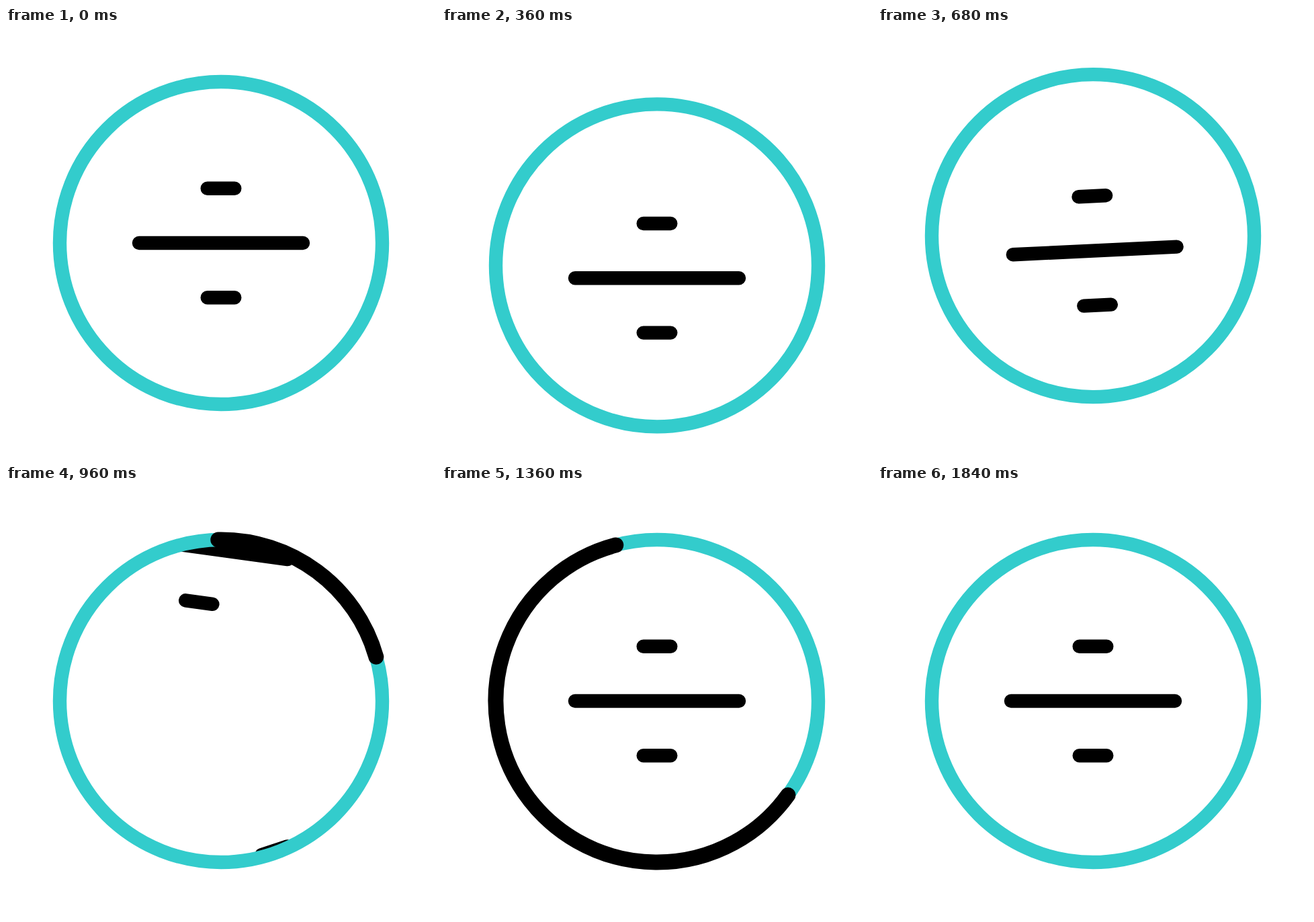
An HTML page for the animation above (2000 ms loop, 640 px wide and 640 px high).

```html
<!DOCTYPE html>
<html lang="en">
<head>
<meta charset="utf-8">
<title>Division sign</title>
<style>
  html, body { margin: 0; width: 100%; height: 100%; overflow: hidden; background: #fff; }
  svg { display: block; width: 100%; height: 100%; }
  path, circle { fill: none; stroke-width: 20.4; stroke-linecap: round; }
  .sign { stroke: #000; }
  #ring { stroke: #3cc; }
  #arc { stroke: #000; stroke-width: 23; }
</style>
</head>
<body>
<svg viewBox="-320 -320 640 640">
  <defs>
    <clipPath id="disc"><circle id="hole" r="240"/></clipPath>
    <path id="divide" d="M-122 0H122M-20.3 -81.3H20.3M-20.3 81.3H20.3"/>
  </defs>
  <g clip-path="url(#disc)" class="sign">
    <use id="leaving" href="#divide"/>
    <use id="arriving" href="#divide"/>
  </g>
  <circle id="ring" r="240"/>
  <path id="arc"/>
</svg>
<script>
const LOOP = 2000, STEP = 40, RADIUS = 240;
const el = id => document.getElementById(id);

// Keyframes: [time, value, value, ...], eased in and out between neighbours.
const ringKeys = [[120, 0], [360, 33.4], [560, -30.8], [760, 0]];
const leavingKeys = [ // x, y, rotation
  [120, 0, 0, 0], [360, 0, 52.3, 0], [560, 0, -62.7, 0],
  [760, 4.2, 51.7, -4.2], [1160, -47.6, -506.7, 19.8]
];
const arrivingKeys = [[760, 210, 600, -36.8], [1160, 0, 0, 0]];
const arcStartKeys = [[1040, 0], [1840, 1]];
const arcEndKeys = [[760, 0], [1440, 1]];

function sample(keys, t) {
  if (t <= keys[0][0]) return keys[0].slice(1);
  const i = keys.findIndex(key => key[0] > t);
  if (i < 0) return keys[keys.length - 1].slice(1);
  const [t0, ...from] = keys[i - 1], [t1, ...to] = keys[i];
  const u = (t - t0) / (t1 - t0), eased = u * u * (3 - 2 * u);
  return from.map((v, k) => v + (to[k] - v) * eased);
}

function place(node, [x, y, turn = 0]) {
  node.setAttribute('transform', `translate(${x} ${y}) rotate(${turn})`);
}

function ringPoint(fraction) {
  const a = (fraction * 360 - 91) * Math.PI / 180;
  return `${RADIUS * Math.cos(a)} ${RADIUS * Math.sin(a)}`;
}

function arcPath(start, end) {
  if (end <= start) return '';
  const mid = (start + end) / 2, curve = `A${RADIUS} ${RADIUS} 0 0 1 `;
  return `M${ringPoint(start)}${curve}${ringPoint(mid)}${curve}${ringPoint(end)}`;
}

function draw(now) {
  const t = Math.floor(now % LOOP / STEP) * STEP;
  const [ringY] = sample(ringKeys, t);
  place(el('ring'), [0, ringY]);
  place(el('hole'), [0, ringY]);
  place(el('leaving'), sample(leavingKeys, t));
  place(el('arriving'), sample(arrivingKeys, t));
  el('arc').setAttribute('d', arcPath(sample(arcStartKeys, t)[0], sample(arcEndKeys, t)[0]));
}

let began;
function tick(now) {
  began ??= now;
  draw(now - began);
  requestAnimationFrame(tick);
}
draw(0);
requestAnimationFrame(tick);
</script>
</body>
</html>
```
